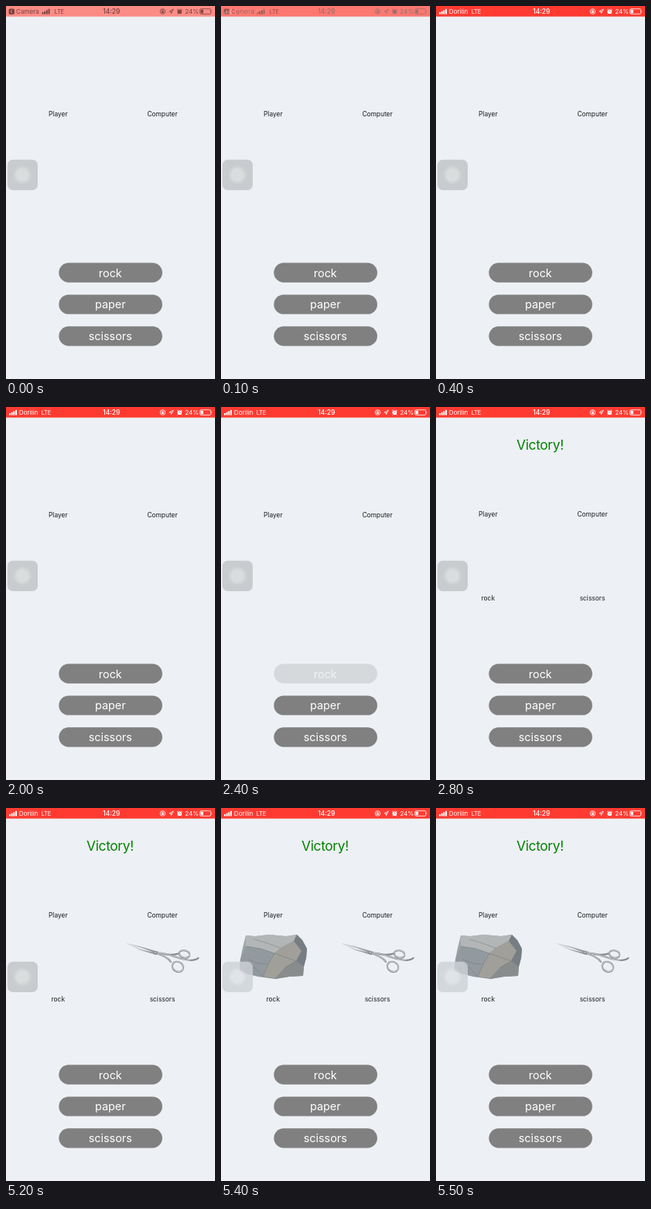
Write an HTML page that moves like this. It is 270x480 px and loops after 8 s.

```html
<!DOCTYPE html>
<html lang="en">
<head>
<meta charset="utf-8">
<title>Rock, paper, scissors</title>
<style>
  html, body { margin: 0; width: 100%; height: 100%; overflow: hidden; background: #edf0f4; }
  svg { display: block; width: 100%; height: 100%; font-family: Inter, Roboto, sans-serif; }
  .center { text-anchor: middle; }
  .label { font-size: 8.4px; fill: #1c1c1e; text-anchor: middle; }
  .button rect { fill: #808080; }
  .button text { font-size: 14.4px; fill: #fff; text-anchor: middle; }
  .status { font-size: 8.1px; fill: currentColor; }
  .line { fill: none; stroke: currentColor; stroke-width: .8; }
</style>
</head>
<body>
<svg viewBox="0 0 270 480">
  <defs>
    <linearGradient id="stone" x2="1" y2="1">
      <stop stop-color="#a5aaae"/><stop offset="1" stop-color="#7e8488"/>
    </linearGradient>
    <linearGradient id="steel" x2="1" y2="1">
      <stop stop-color="#c9cccd"/><stop offset="1" stop-color="#85898b"/>
    </linearGradient>
    <g id="bars">
      <rect x="4" y="8" width="1.9" height="2.5"/>
      <rect x="6.7" y="6.7" width="1.9" height="3.8"/>
      <rect x="9.4" y="5.3" width="1.9" height="5.2"/>
      <rect x="12.1" y="3.8" width="1.9" height="6.7"/>
    </g>
  </defs>

  <rect width="270" height="480" fill="#edf0f4"/>
  <rect id="bar" width="270" height="13.6"/>

  <g class="status" id="returnLink" color="#79423f">
    <rect x="3.6" y="3.5" width="7.3" height="7.3" rx="1.6"/>
    <path d="M8 5.2 6 7.1 8 9" fill="none" stroke="#fb8e88"/>
    <text x="13" y="10">Camera</text>
    <use href="#bars" x="42.5"/>
    <text x="62.6" y="10" font-size="7.5" letter-spacing="-.2">LTE</text>
  </g>

  <g class="status" id="carrier" color="#fff">
    <use href="#bars"/>
    <text x="16.8" y="10">Dorilin</text>
    <text x="45.8" y="10" font-size="7.5" letter-spacing="-.2">LTE</text>
  </g>

  <g class="status" id="indicators">
    <text class="center" x="136.3" y="10.1" font-weight="500" font-size="8.5">14:29</text>
    <circle class="line" cx="202.4" cy="7" r="3.3"/>
    <rect x="200.9" y="6.6" width="3" height="2.2"/>
    <path class="line" d="M201.5 6.6V5.8a.9.9 0 0 1 1.8 0v.8"/>
    <path class="line" d="M216.3 4 210.9 7H213.4V9.6Z"/>
    <circle cx="224.3" cy="7.2" r="2.8"/>
    <path class="line" d="M221 5.2 222.7 3.7M225.9 3.7 227.6 5.2M222.3 9.5 221.5 10.5M226.3 9.5 227.1 10.5"/>
    <path d="M224.3 5.5V7.4H225.8" fill="none" stroke="#ff3a31" stroke-width=".6"/>
    <text x="231.2" y="10">24%</text>
    <rect class="line" x="250.6" y="3.7" width="14" height="6.6" rx="1.5" stroke-width=".6"/>
    <rect x="251.6" y="4.7" width="3.2" height="4.6" rx=".6"/>
    <path d="M265.5 5.8q1.3 1.2 0 2.4Z"/>
  </g>

  <text id="verdict" class="center" x="134.5" y="54.6" font-size="17.3" letter-spacing="-.3" fill="#008000">Victory!</text>
  <g id="players">
    <text class="label" x="67.3" y="142">Player</text>
    <text class="label" x="202" y="142">Computer</text>
  </g>
  <g id="choices">
    <text class="label" x="67.3" y="249">rock</text>
    <text class="label" x="202" y="249">scissors</text>
  </g>

  <g id="rockPhoto">
    <path fill="url(#stone)" d="M32 164 44 165 62 163 84 165 98 163 105 170 111 181 110 193 107 204 106 216 88 217 70 220 48 217 32 213 24 209 25 195 28 180Z"/>
    <path fill="#b2b6b7" d="M32 164 44 165 62 163 84 165 98 163 94 171 77 180 69 187 51 181 32 178Z"/>
    <path fill="#929a9f" d="M32 178 51 181 69 187 61 201 54 217 32 213 24 209 25 195Z"/>
    <path fill="#a09f99" d="M69 187 77 180 94 171 104 184 97 197 83 205 70 219 54 217 61 201Z"/>
    <path fill="#777e83" d="M98 163 105 170 111 181 110 193 107 204 97 197 104 184 94 171Z"/>
    <path fill="#898c8c" d="M97 197 107 204 106 216 88 217 70 220 83 205Z"/>
    <path fill="none" stroke="#6c747a" stroke-width=".7" opacity=".65" d="M32 178 51 181 69 187 61 201 54 217M35 195 48 200 61 201M69 187 86 193 97 197 83 205M43 169 57 173 77 180M28 207 43 205 54 217"/>
  </g>

  <g id="scissorsPhoto" fill="none" stroke-linecap="round">
    <path fill="url(#steel)" d="M155 174 173 178 197 185 194 189 174 183Z"/>
    <path fill="#eceeee" d="M157 174.8 175 180 191 186 174 182Z"/>
    <g stroke="#85898b" stroke-width="2.1">
      <path d="M193 186Q207 187 217 191T238 196Q245 196 248.5 193"/>
      <path d="M193 187Q207 190 213 198"/>
      <path d="M204 188Q216 190 224 187"/>
      <ellipse cx="230.5" cy="188" rx="6.8" ry="4.6" transform="rotate(12 230.5 188)"/>
      <ellipse cx="222" cy="204.3" rx="7.4" ry="6.3" transform="rotate(30 222 204.3)"/>
    </g>
    <g stroke="#d9dcdd" stroke-width=".8">
      <path d="M195 186Q207 187 217 191T238 196"/>
      <path d="M195 187.5Q207 190 213 198"/>
      <ellipse cx="230.5" cy="187.8" rx="6.8" ry="4.6" transform="rotate(12 230.5 188)"/>
      <ellipse cx="222" cy="204.1" rx="7.4" ry="6.3" transform="rotate(30 222 204.3)"/>
    </g>
    <circle cx="193" cy="186" r="2" fill="#8b8f91"/>
    <circle cx="192.7" cy="185.7" r=".8" fill="#eee"/>
  </g>

  <g id="assist">
    <rect x="1.8" y="197.8" width="39.2" height="39.2" rx="7"/>
    <g fill="#fff">
      <circle cx="21.2" cy="217.4" r="12.3" opacity=".08"/>
      <circle cx="21.2" cy="217.4" r="10.3" opacity=".13"/>
      <circle cx="21.2" cy="217.4" r="8.3" opacity=".16"/>
    </g>
  </g>

  <g id="rockButton" class="button">
    <rect x="68.3" y="330.6" width="133.6" height="25.2" rx="12.6"/>
    <text x="134.8" y="348.6">rock</text>
  </g>
  <g class="button">
    <rect x="68.3" y="371.4" width="133.6" height="25.2" rx="12.6"/>
    <text x="134.8" y="389.4">paper</text>
  </g>
  <g class="button">
    <rect x="68.3" y="412.2" width="133.6" height="25.2" rx="12.6"/>
    <text x="134.8" y="430.2">scissors</text>
  </g>
</svg>
<script>
  const LOOP = 8000, STEP = 100;
  const PRESS = 2400, RESULT = 2500, SCISSORS = 5200, ROCK = 5400;
  const el = id => document.getElementById(id);
  const clamp = x => Math.min(1, Math.max(0, x));
  const ease = x => x < .5 ? 2 * x * x : 1 - 2 * (1 - x) ** 2;
  const blend = (from, to, p) => `rgb(${from.map((v, i) => Math.round(v + (to[i] - v) * p))})`;
  const fade = (id, opacity) => el(id).setAttribute('opacity', opacity);

  function draw(now) {
    const t = Math.floor(now % LOOP / STEP) * STEP;

    const p = clamp(t / 400);
    el('bar').setAttribute('fill', blend([251, 139, 133], [255, 58, 49], p));
    el('indicators').setAttribute('color', blend([121, 66, 63], [255, 255, 255], p));
    fade('returnLink', 1 - p);
    fade('carrier', p);

    fade('rockButton', t < PRESS ? 1 : .2 + .8 * ease(clamp((t - 2450) / 250)));

    const decided = t >= RESULT;
    fade('verdict', +decided);
    fade('choices', +decided);
    el('players').setAttribute('transform', `translate(0 ${decided ? -.7 : 0})`);
    fade('scissorsPhoto', +(t >= SCISSORS));
    fade('rockPhoto', +(t >= ROCK));

    el('assist').setAttribute('fill', t >= ROCK ? 'rgba(206,211,215,.8)' : '#c9cccf');
    requestAnimationFrame(tick);
  }

  const start = performance.now();
  const tick = () => draw(performance.now() - start);
  tick();
</script>
</body>
</html>
```
